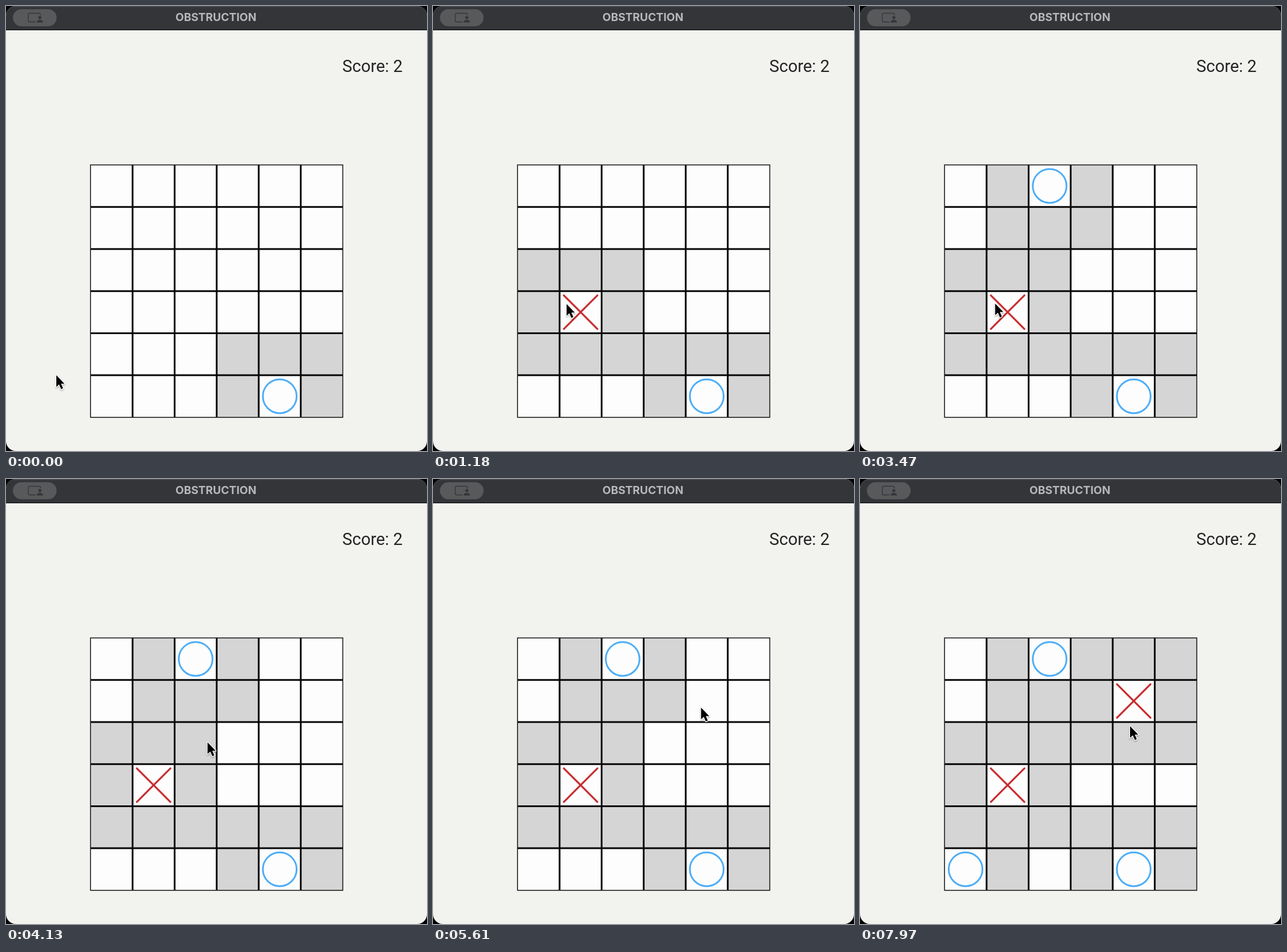
Animation, 728 px wide and 769 px high, one loop 8 s. Source, as an HTML page:

```html
<!DOCTYPE html>
<html lang="en">
<head>
<meta charset="utf-8">
<title>Obstruction</title>
<style>
  html, body { margin: 0; width: 100%; height: 100%; overflow: hidden; background: #000; }
  svg { display: block; width: 728px; height: 769px; }
  .title { font: 700 19px Inter, sans-serif; fill: #b7b8ba; text-anchor: middle; }
  .score { font: 400 29px Roboto, sans-serif; fill: #242424; }
  .o { fill: none; stroke: #4dadf7; stroke-width: 3; }
  .x { fill: none; stroke: #c62d30; stroke-width: 3.2; stroke-linecap: round; }
  .icon { fill: none; stroke: #35363a; stroke-width: 1.4; }
</style>
</head>
<body>
<svg viewBox="0 0 728 769">
  <defs>
    <clipPath id="frame"><rect width="728" height="769" rx="17"/></clipPath>
    <filter id="shadow" x="-50%" y="-50%" width="200%" height="200%">
      <feDropShadow dx="0" dy="1.5" stdDeviation="1.2" flood-opacity=".35"/>
    </filter>
  </defs>
  <g clip-path="url(#frame)">
    <rect width="728" height="769" fill="#f2f2ef"/>
    <rect width="728" height="42" fill="#343539"/>
    <rect width="728" height="1.5" fill="#4c4e56"/>
    <rect y="40.5" width="728" height="1.5" fill="#1c1d1f"/>
    <rect x="12" y="5.5" width="75.5" height="29.5" rx="14.75" fill="#58595b"/>
    <path class="icon" d="M51 27.5H41q-2.500 0-2.500-2.500V15q0-2.500 2.500-2.500H57q2.500 0 2.500 2.500V16"/>
    <circle cx="58.500" cy="20" r="2.700" fill="#35363a"/>
    <path d="M53 28.500q0-4.500 5.500-4.500t5.500 4.500z" fill="#35363a"/>
    <text class="title" x="363" y="26">OBSTRUCTION</text>
    <text class="score" x="581.500" y="114">Score: 2</text>
    <g id="cells"></g>
    <path id="lines" stroke="#050505" stroke-width="3" fill="none"/>
    <rect id="edge" stroke="#111" stroke-width="1.500" fill="none"/>
    <g id="marks"></g>
    <path id="cursor" d="M0 0V20.200L4.700 15.900L8.300 24.100L11.700 22.600L8.200 14.700H14.200Z"
      fill="#000" stroke="#fff" stroke-width="2.400" stroke-linejoin="round"
      paint-order="stroke" filter="url(#shadow)"/>
  </g>
</svg>
<script>
const LOOP = 8000, TICK = 73.8;
const N = 6, SIZE = 72.7, LEFT = 146.2, TOP = 274.6;

// tick, kind, row, column
const moves = [
  [0, 'o', 5, 4], [16, 'x', 3, 1], [29, 'o', 0, 2], [83, 'x', 1, 4], [84, 'o', 5, 0]
];
// tick, x, y
const path = [
  [0, 87, 638], [14, 231, 515], [46, 232, 515], [66, 465, 395],
  [75, 465, 395], [76, 463.5, 395], [103, 463.5, 395], [108, 467, 427]
];

const $ = id => document.getElementById(id);
function add(parent, tag, attrs) {
  const el = document.createElementNS('http://www.w3.org/2000/svg', tag);
  for (const k in attrs) el.setAttribute(k, attrs[k]);
  return parent.appendChild(el);
}

const cells = [];
for (let i = 0; i < N * N; i++) {
  const row = Math.floor(i / N), col = i % N;
  const el = add($('cells'), 'rect', {
    x: LEFT + col * SIZE, y: TOP + row * SIZE, width: SIZE, height: SIZE
  });
  // A cell is blocked once any neighbour is taken
  const near = moves.filter(([, , r, c]) =>
    Math.max(Math.abs(r - row), Math.abs(c - col)) === 1);
  cells.push({ el, from: Math.min(...near.map(m => m[0])) });
}

let d = '';
for (let i = 1; i < N; i++) {
  const p = i * SIZE, len = N * SIZE;
  d += `M${LEFT + p} ${TOP}v${len}M${LEFT} ${TOP + p}h${len}`;
}
$('lines').setAttribute('d', d);
for (const [k, v] of Object.entries({ x: LEFT, y: TOP, width: N * SIZE, height: N * SIZE }))
  $('edge').setAttribute(k, v);

const marks = moves.map(([from, kind, row, col]) => {
  const cx = LEFT + (col + .5) * SIZE, cy = TOP + (row + .5) * SIZE;
  const el = kind === 'o'
    ? add($('marks'), 'circle', { class: 'o', cx, cy, r: 29.2 })
    : add($('marks'), 'path', {
        class: 'x', d: `M${cx - 29} ${cy - 29}l58 58m0-58l-58 58`
      });
  return { el, from };
});

function cursorAt(n) {
  const i = path.findIndex(p => p[0] > n);
  if (i < 0) return path[path.length - 1].slice(1);
  const [t0, x0, y0] = path[i - 1], [t1, x1, y1] = path[i];
  const u = (n - t0) / (t1 - t0), e = u * u * (3 - 2 * u);
  return [x0 + (x1 - x0) * e, y0 + (y1 - y0) * e];
}

function draw(t) {
  const n = Math.floor((t + 6) / TICK);
  for (const c of cells) c.el.setAttribute('fill', n >= c.from ? '#d5d5d5' : '#fdfdfd');
  for (const m of marks) m.el.setAttribute('visibility', n >= m.from ? 'visible' : 'hidden');
  $('cursor').setAttribute('transform', `translate(${cursorAt(n)})`);
}

let start;
function loop(now) {
  start ??= now;
  draw((now - start) % LOOP);
  requestAnimationFrame(loop);
}
draw(0);
requestAnimationFrame(loop);
</script>
</body>
</html>
```
